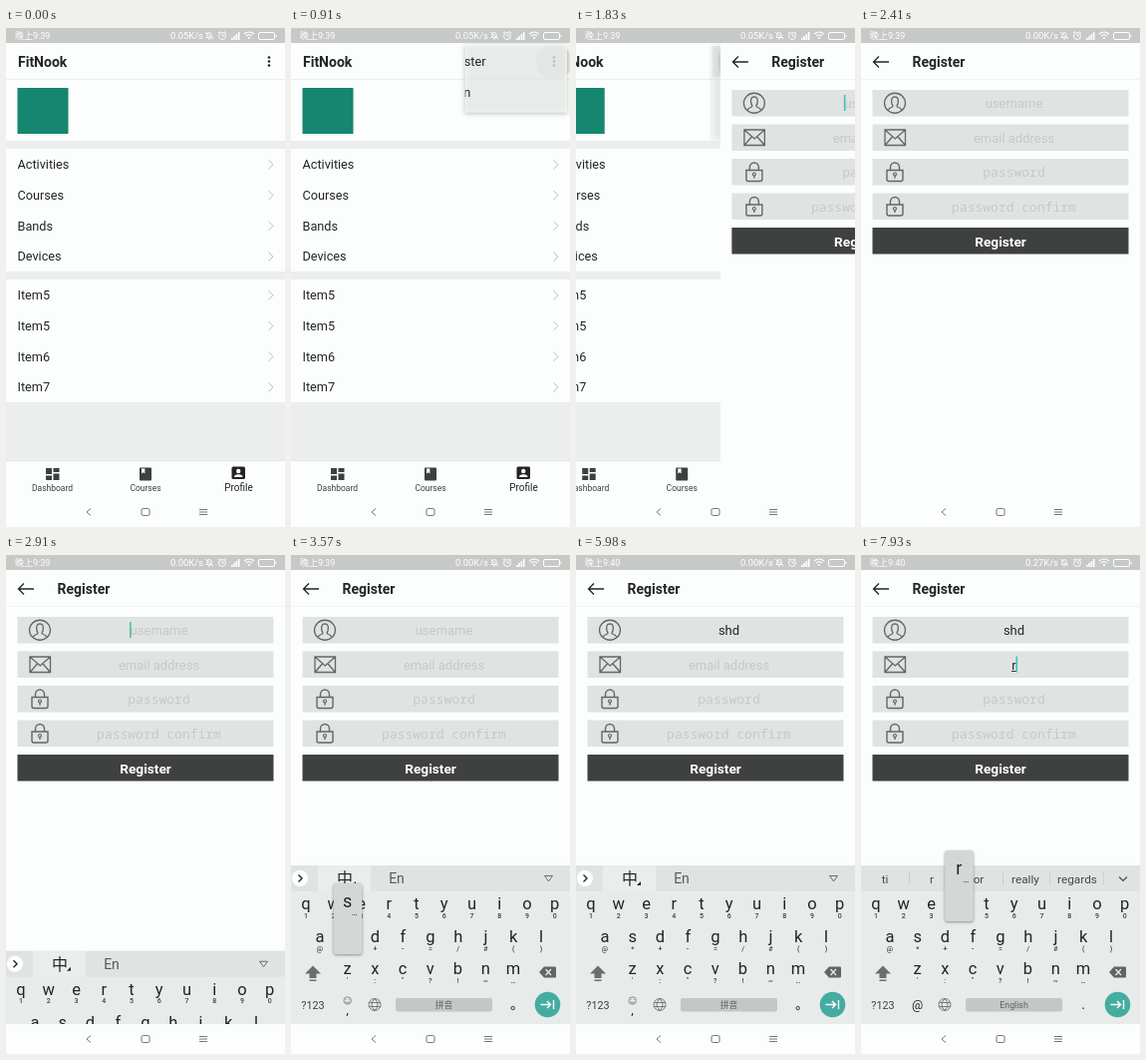
Animation of 280 by 500 pixels, one loop 8 s. Source, as an HTML page with a canvas:

```html
<!DOCTYPE html>
<html lang="en">
<head>
<meta charset="utf-8">
<title>Register form</title>
<style>
  html, body { margin: 0; width: 280px; height: 500px; overflow: hidden; background: #fbfefc; }
  canvas { display: block; }
</style>
</head>
<body>
<canvas id="stage" width="280" height="500"></canvas>
<script>
const ctx = document.getElementById('stage').getContext('2d');
const LOOP = 8000;
const SANS = 'Roboto, "Noto Sans CJK SC", "Noto Sans CJK", sans-serif';
const MONO = '"Noto Sans Mono", monospace';
const PAPER = '#fbfefc', INK = '#222524', GREY = '#6a6f6d', TEAL = '#45aca0';

const clamp = x => Math.max(0, Math.min(1, x));
const progress = (t, from, to) => clamp((t - from) / (to - from));
const easeOut = x => 1 - (1 - x) ** 3;
const during = (t, from, to) => t >= from && t < to;
// Latest value of a [time, value] schedule
const latest = (t, steps) => steps.filter(s => s[0] <= t).pop()[1];

function rect(x, y, w, h, color, r = 0) {
  ctx.fillStyle = color;
  ctx.beginPath();
  ctx.roundRect(x, y, w, h, r);
  ctx.fill();
}
function disc(x, y, r, color) {
  ctx.fillStyle = color;
  ctx.beginPath();
  ctx.arc(x, y, r, 0, 7);
  ctx.fill();
}
function stroke(d, color = INK, width = 1) {
  ctx.strokeStyle = color;
  ctx.lineWidth = width;
  ctx.stroke(new Path2D(d));
}
function fill(d, color = INK) {
  ctx.fillStyle = color;
  ctx.fill(new Path2D(d), 'evenodd');
}
function text(s, x, y, size, { color = INK, align = 'left', weight = 400, font = SANS } = {}) {
  ctx.font = `${weight} ${size}px ${font}`;
  ctx.textAlign = align;
  ctx.fillStyle = color;
  ctx.fillText(s, x, y);
}
const label = (s, x, y, size, color, weight) => text(s, x, y, size, { color, weight, align: 'center' });

function layer(draw, { x = 0, y = 0, alpha = 1, clip } = {}) {
  ctx.save();
  if (clip) {
    ctx.beginPath();
    ctx.rect(...clip);
    ctx.clip();
  }
  ctx.globalAlpha = alpha;
  ctx.translate(x, y);
  draw();
  ctx.restore();
}
function shadow(draw, blur, color, dy = 1) {
  ctx.save();
  ctx.shadowBlur = blur;
  ctx.shadowColor = color;
  ctx.shadowOffsetY = dy;
  draw();
  ctx.restore();
}

function statusBar(t) {
  const white = '#fff';
  rect(0, 0, 280, 15, '#c7c9c7');
  text('晚上' + (t < 5300 ? '9:39' : '9:40'), 9, 11, 9, { color: white });
  const speed = latest(t, [[0, '0.05'], [2410, '0.00'], [6440, '0.27']]);
  text(speed + 'K/s', 165, 11, 9.4, { color: white });
  stroke('M201 9.500h6q-1-1-1-3a2 2 0 0 0-4 0q0 2-1 3M200 4l8 7M203 11h2', white, .9);
  stroke('M213.500 8a3.500 3.500 0 1 0 7 0a3.500 3.500 0 1 0-7 0M217 6v2h2M213 5l2-1.500M221 5l-2-1.500', white, .9);
  for (let i = 0; i < 4; i++) rect(226 + i * 2.3, 10 - i * 2, 1.6, 2 + i * 2, white);
  stroke('M239 6q5-4 10 0M241 8q3-2.500 6 0', white, 1.2);
  disc(244, 10, 1.1, white);
  stroke('M255 4.500h13q1.500 0 1.500 1.500v4q0 1.500-1.500 1.500h-13q-1.500 0-1.500-1.500v-4q0-1.500 1.500-1.500M271 7v2', white, 1);
}

function systemNav() {
  rect(0, 470, 280, 30, PAPER);
  stroke('M85 481.500L81 485l4 3.500M137.500 481.500h5q1.500 0 1.500 1.500v4q0 1.500-1.500 1.500h-5q-1.500 0-1.500-1.500v-4q0-1.500 1.500-1.500M194 482.500h8M194 485h8M194 487.500h8', '#727674', 1);
}

function profilePage(t) {
  rect(0, 15, 280, 455, '#eceeed');
  rect(0, 15, 280, 98, PAPER);
  rect(0, 51, 280, 1, '#eceeed');
  text('FitNook', 12, 38.500, 14, { weight: 700 });
  const ring = progress(t, 540, 780);
  if (during(t, 540, 1330)) {
    const fade = 1 - progress(t, 850, 1330);
    disc(264, 34, 5 + 13 * easeOut(ring), `rgba(0,0,0,${.11 * fade})`);
  }
  for (const y of [29.5, 33.5, 37.5]) disc(264, y, 1.3, INK);
  rect(11.5, 60, 51, 46, '#15866f');

  const lists = [[121, ['Activities', 'Courses', 'Bands', 'Devices']], [252, ['Item5', 'Item5', 'Item6', 'Item7']]];
  for (const [top, names] of lists) {
    rect(0, top, 280, 123, PAPER);
    names.forEach((name, i) => {
      const y = top + 15.8 + i * 30.75;
      text(name, 11.5, y + 4.4, 12.7);
      stroke(`M263.500 ${y - 4.5}l4.500 4.500l-4.500 4.500`, '#b9bdbb');
    });
  }

  rect(0, 434, 280, 36, PAPER);
  rect(0, 433.500, 280, .7, '#e0e3e1');
  fill('M40 441h6v6h-6zM40 448.500h6v4.500h-6zM47.500 441h6v4h-6zM47.500 446.500h6v6.500h-6z', '#3c403e');
  fill('M135 440.500h10q1 0 1 1v11q0 1-1 1h-10q-1 0-1-1v-11q0-1 1-1M136 441.500v5l1.700-1.300l1.700 1.300v-5z', '#3c403e');
  rect(226.500, 439.500, 13.500, 12.500, INK, 1.5);
  disc(233.250, 444, 2.200, PAPER);
  fill('M229 450q0-2.700 4.250-2.700t4.250 2.700z', PAPER);
  label('Dashboard', 46.5, 464, 8.5, '#3c403e');
  label('Courses', 140, 464, 8.5, '#3c403e');
  label('Profile', 233.5, 464, 10);
}

function menu(t) {
  const open = easeOut(progress(t, 780, 1150));
  const alpha = Math.min(open, 1 - progress(t, 1740, 1900));
  if (!alpha) return;
  const w = 140 * open, h = 94 * open;
  layer(() => {
    shadow(() => rect(277 - w, 16, w, h, '#f9fcfa', 1), 5, 'rgba(0,0,0,.35)');
    layer(() => {
      const press = progress(t, 1370, 1740);
      if (press) {
        rect(137, 18, 140, 31, `rgba(0,0,0,${.05 * press})`);
        layer(() => disc(186, 34, 12 + 31 * press, 'rgba(0,0,0,.09)'), { clip: [137, 18, 140, 31] });
      }
      ['Register', 'Login', 'Logout'].forEach((s, i) => text(s, 149, 38 + i * 30.7, 12.7));
    }, { clip: [277 - w, 16, w, h] });
  }, { alpha });
}

function lockIcon(y) {
  stroke(`M26 ${y - 2}h16v9q0 2-2 2h-12q-2 0-2-2zM29.500 ${y - 2}v-3a4.500 4.500 0 0 1 9 0v3M34 ${y + 3}v3`, '#626765', 1.4);
  stroke(`M32.500 ${y + 2}a1.500 1.500 0 1 0 3 0a1.500 1.500 0 1 0-3 0`, '#626765', 1.2);
}

function registerPage(t) {
  rect(0, 15, 280, 455, PAPER);
  rect(0, 51, 280, 1, '#f0f3f1');
  stroke('M28 34H12.500M18 28.500L12.500 34l5.500 5.500', INK, 1.3);
  text('Register', 51.5, 38.500, 14, { weight: 700 });

  const userDone = t >= 5440, mailDone = t >= 7890;
  const fields = [
    [62, userDone ? 'shd' : 'username', userDone],
    [96.500, mailDone ? 'r' : 'email address', mailDone],
    [131, 'password', false, MONO],
    [165.500, 'password confirm', false, MONO],
  ];
  for (const [y, s, done, font = SANS] of fields) {
    rect(11.5, y, 257, 26.500, '#e0e3e1');
    text(s, 153.5, y + 18, 13, { font, align: 'center', color: done ? INK : '#c5c9c7' });
  }
  if (mailDone) rect(151, 116, 5, .9, INK);
  stroke('M23.500 75.250a10.500 10 0 1 0 21 0a10.500 10 0 1 0-21 0M27 82.500q1-2.500 4.500-3.500q1-1-.500-3q-1.500-7 3-7t3 7q-1.500 2-.500 3q3.500 1 4.500 3.500', '#626765', 1.3);
  stroke('M24 102h20.500v15.500H24zM24 102l10.250 9l10.250-9M24 117.500l7.500-8.500M44.500 117.500l-7.500-8.500', '#626765', 1.3);
  lockIcon(144.500);
  lockIcon(179);
  rect(11.5, 200, 257, 26.500, '#3e413f');
  label('Register', 140, 218.500, 13.7, '#fff', 700);

  const blinkStart = latest(t, [[0, 1740], [5480, 5480], [7060, 7060], [7890, 7890]]);
  if (Math.floor((t - blinkStart) / 500) % 2 === 0) {
    const [x, y] = latest(t, [[0, [124, 67]], [5480, [162, 67]], [7060, [112.500, 101.500]], [7890, [155.500, 101.500]]]);
    rect(x, y, 1.6, 16, '#46c2ae');
  }
}

const PITCH = 27.75;
const KEY_ROWS = [
  { keys: 'qwertyuiop', hints: '1234567890', x: 15, y: 355 },
  { keys: 'asdfghjkl', hints: '@*+-=/#()', x: 29, y: 388 },
  { keys: 'zxcvbnm', hints: "':\"?!~…", x: 56.5, y: 420 },
];
const PRESSES = [['s', 3570, 3700], ['h', 4480, 4610], ['d', 4740, 4880], ['r', 7810, LOOP]];

function keyPopup(key) {
  const row = KEY_ROWS.find(r => r.keys.includes(key));
  const x = row.x + PITCH * row.keys.indexOf(key);
  const top = row.y - 59;
  shadow(() => rect(x - 14, top, 28.500, 71, '#d3d8d6', 3), 3, 'rgba(0,0,0,.4)');
  label(key, x, top + 24, 18);
  label('…', x + 7, top + 32, 9);
}

function toolbar(t, english) {
  const tab = english ? 80 : 27;
  rect(tab, 311, 53, 26, '#e9edec');
  disc(9, 324, 8, '#fff');
  stroke('M7.500 320.500l3.500 3.500l-3.500 3.500', INK, 1.4);
  label('中', 54, 330, 16, english ? GREY : INK);
  fill('M65 327v4h-4z', english ? GREY : INK);
  label('En', 106, 329, 14, english ? INK : '#555a58');
  stroke('M254.500 321.500h8l-4 5.500z', GREY);
}

function chinesePicks(t) {
  const [typed, words] = latest(t, [
    [0, ['s', ['是', '说', 's', '时', '上', '三']]],
    [4560, ['sh', ['是', '说', 'sh', '时', '上', '事']]],
    [4820, ['sh d', ['商店', '收到', 'shd', '时代', '深度', '湿度']]],
  ]);
  rect(0, 298, 12 + typed.length * 5.2, 14, '#e2e6e5', 2);
  text(typed, 7, 308.500, 10);
  if (t >= 5230) rect(82, 312, 40, 24, '#cfd4d2', 2);
  words.forEach((word, i) => {
    const x = 21 + i * 40.8;
    label(word, x, 329.500, /[a-z]/.test(word) ? 13.5 : 14.5, i ? '#3c413f' : '#111', i ? 400 : 500);
    if (i) rect(x - 20.5, 318, .7, 13, '#cdd2d0');
  });
  for (const x of [118, 241]) rect(x, 331, 4, .8, GREY);
}

function englishPicks() {
  ['ti', 'r', 'or', 'really', 'regards'].forEach((word, i) => {
    const x = [24, 71, 118, 165, 217][i];
    label(word, x, 328.500, 11.8, '#454a48');
    rect([48, 95, 142, 189, 243][i], 317, .8, 14, '#c5cac8');
  });
}

function keyboard(t) {
  const english = t >= 7140;
  const composing = during(t, 3650, 5400);
  rect(0, 311, 280, 160, '#e7ebea');
  rect(0, 311, 280, 26, '#dfe4e3');
  if (composing) chinesePicks(t);
  else if (t >= 7850) englishPicks();
  else toolbar(t, english);
  if (composing || t >= 7850) stroke('M259 322.500l4 4l4-4', '#4a4f4d', 1.2);

  for (const { keys, hints, x, y } of KEY_ROWS) {
    [...keys].forEach((key, i) => {
      label(key, x + i * PITCH, y, 16.5);
      label(hints[i], x + i * PITCH, y + 8.500, 7, '#3c413f', 500);
    });
  }
  if (composing) label("'词", 22, 423, 14);
  else fill('M22 411.500l8 8h-4.500v4.500h-7v-4.500H14zM18.500 425.500h7v1.500h-7z', GREY);
  fill('M254 412.500h11q1 0 1 1v9q0 1-1 1h-11l-5-5.500z', '#606563');
  stroke('M255.500 415l5.500 6M261 415l-5.500 6', '#e7ebea', 1.3);

  label('?123', 22, 454.500, 10.8, '#3c413f');
  if (english) label('@', 56.500, 454.500, 12.5);
  else {
    stroke('M53 446.500a3.700 3.700 0 1 0 7.400 0a3.700 3.700 0 1 0-7.400 0M54.700 447.500q2 2.500 4 0M55.300 445v.8M58 445v.8', GREY, .8);
    label(',', 56.500, 459.500, 13);
  }
  stroke('M78 450.500a6 6 0 1 0 12 0a6 6 0 1 0-12 0M84 444.500q-6 6 0 12q6-6 0-12M78.500 448.500h11M78.500 452.500h11', GREY, .9);
  rect(105, 444, 97, 13.500, '#c3c8c6', 2);
  label(english ? 'English' : '拼音', 153.5, 454, 8.8, '#5d6260');
  if (english) label('.', 223, 454.500, 14);
  else stroke('M221 454a1.700 1.700 0 1 0 3.400 0a1.700 1.700 0 1 0-3.400 0', INK, .9);
  disc(257.5, 450.500, 12.800, TEAL);
  stroke(composing
    ? 'M263 447v4h-11M255.500 447.500l-3.500 3.500l3.500 3.500'
    : 'M250.500 450.500h10M257 447l3.500 3.500l-3.500 3.500M263.500 446v9', '#fff', 1.4);

  const press = PRESSES.find(([, from, to]) => during(t, from, to));
  if (press) keyPopup(press[0]);
}

function draw(t) {
  rect(0, 0, 280, 500, PAPER);
  const slide = easeOut(progress(t, 1760, 2120));
  if (slide < 1) {
    layer(() => profilePage(t), { x: -70 * slide });
    menu(t);
  }
  if (slide > 0) layer(() => registerPage(t), { x: 280 * (1 - slide) });
  statusBar(t);
  const rise = easeOut(progress(t, 2760, 3530));
  if (rise > 0) layer(() => keyboard(t), { y: 165 * (1 - rise) });
  systemNav();
}

function frame() {
  draw(performance.now() % LOOP);
  requestAnimationFrame(frame);
}
frame();
</script>
</body>
</html>
```
